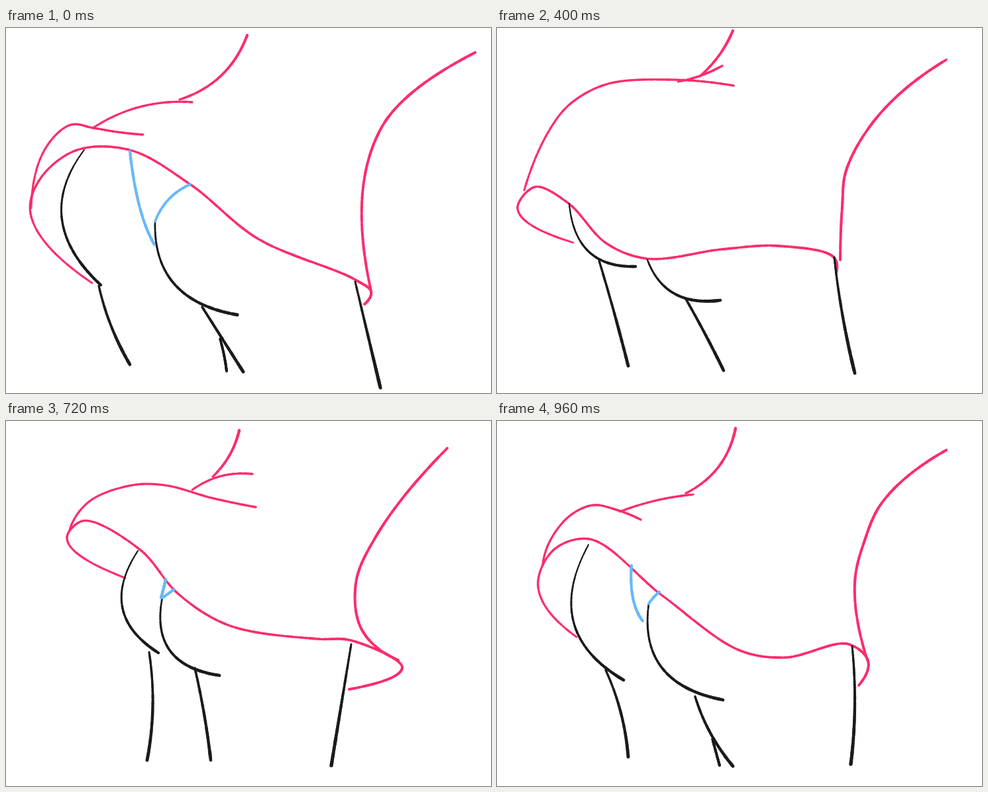
An HTML page with a canvas for the animation above (1040 ms loop, 732 by 551 pixels).

```html
<!DOCTYPE html>
<html lang="en">
<head>
<meta charset="utf-8">
<title>Crayon sway</title>
<style>
html, body { margin: 0; width: 100%; height: 100%; overflow: hidden; background: #fff; }
canvas { display: block; }
</style>
</head>
<body>
<canvas id="stage" width="732" height="551"></canvas>
<script>
const ctx = document.getElementById('stage').getContext('2d');
const STEP = 80, STEPS = 13;
const KEYS = [0, 3, 5, 7, 9, 11, 12];
const PINK = '#fb2d6c', BLACK = '#191c1b', BLUE = '#68b9fa';
const strokes = [];

// One line per pose: points to pass through, or two ends and a bow. "none" hides it.
function add(color, w0, w1, text) {
  const poses = text.trim().split('\n').map(s => (s.match(/-?\d+/g) || []).map(Number));
  strokes.push({ color, w0, w1, poses });
}

// upper side
add(PINK, 4, 3.3, `364,11 262,108 17
  360,10 315,64 4
  356,4 306,73 5
  356,4 307,82 4
  352,14 312,84 6
  360,9 305,100 10
  360,11 285,109 15`);
// crease
add(PINK, 3, 3.3, `131,151 281,112 13
  290,69 346,66 3
  273,81 340,57 -3
  285,97 356,55 -6
  281,104 372,80 9
  247,122 324,104 10
  185,137 296,111 4`);
// back
add(PINK, 3, 3.3, `38,272 60,181 98,146 132,151 168,157 207,161
  20,229 70,170 125,116 180,78 245,63 318,79
  41,245 78,156 110,115 165,85 260,78 357,87
  72,139 120,97 178,80 230,87 290,98 348,95
  96,164 125,122 190,97 240,97 310,116 377,130
  86,209 115,151 155,115 195,104 247,122 288,141
  69,217 80,181 110,143 145,127 180,134 217,149`);
// hem, from the left loop to the right loop
add(PINK, 3, 3.8, `130,385 37,280 50,230 105,185 186,184 278,236 380,318 527,380 551,398 541,417
  89,261 14,237 35,211 105,208 200,250 265,306 348,336 465,321 505,337 520,371
  115,324 31,272 57,240 107,264 165,325 225,348 340,334 425,329 509,347 512,369
  130,226 65,155 88,131 138,220 190,283 260,320 410,346 488,342 520,374 501,409
  180,237 92,176 115,151 202,194 260,261 335,308 470,329 520,331 598,372 518,405
  128,284 86,212 120,185 165,202 290,307 380,355 480,323 540,308 585,341 527,407
  120,326 62,250 85,195 138,178 250,264 368,347 435,357 531,337 560,362 546,399`);
// right side
add(PINK, 4, 3.8, `708,37 590,119 558,168 538,250 551,397
  684,40 583,133 535,209 517,290 520,357
  678,48 575,133 527,215 521,270 518,350
  645,45 590,118 516,240 527,340 519,403
  666,41 558,175 528,245 537,315 592,361
  666,46 592,128 553,189 540,240 572,318
  678,44 582,122 555,180 540,245 559,361`);
// near curve and leg
add(BLACK, 2, 4.5, `118,184 84,285 143,388
  103,207 98,309 179,372
  109,265 140,339 209,360
  134,217 150,290 195,332
  199,196 176,283 230,350
  160,198 136,305 210,384
  138,187 116,305 191,391`);
add(BLACK, 3.2, 4.8, `140,389 187,508 -5
  141,358 192,502 2
  154,351 198,510 1
  179,326 199,502 -6
  216,349 213,512 7
  190,377 214,512 3
  164,376 198,507 6`);
// middle curve and leg
add(BLACK, 2.5, 4.8, `225,292 252,384 349,433
  214,297 243,378 342,408
  227,350 266,400 337,411
  186,280 219,364 298,376
  236,266 247,346 322,384
  228,281 248,370 344,404
  229,276 247,370 341,421`);
add(BLACK, 3.5, 4.8, `296,421 358,519 0
  283,406 343,514 2
  285,409 342,517 1
  260,384 308,510 -6
  285,373 309,512 2
  300,409 331,517 -3
  299,416 356,521 -6`);
add(BLACK, 3.5, 4, `323,469 333,518 1
  none
  none
  none
  none
  none
  325,480 336,520 0`);
// far leg
add(BLACK, 3, 5.2, `527,383 565,543 0
  516,349 550,531 0
  509,346 540,521 -3
  489,345 510,518 -2
  521,337 491,520 0
  531,311 514,530 7
  536,340 534,518 5`);
// blue wedge
add(BLUE, 4, 4.2, `187,186 206,285 224,327
  199,250 199,288 212,312
  none
  none
  241,239 238,252 234,267
  208,240 214,270 221,303
  203,218 207,275 220,302`);
add(BLUE, 3.8, 3.6, `278,236 225,292 -8
  228,277 213,300 -2
  none
  none
  254,254 236,267 0
  243,268 229,279 0
  245,258 229,276 -1`);

const mix = (a, b, t) => a + (b - a) * t;
const noise = n => { const s = Math.sin(n * 12.9898) * 43758.5453; return s - Math.floor(s); };

function bowed([x0, y0, x1, y1, bow]) {
  const dx = x1 - x0, dy = y1 - y0, k = bow / Math.hypot(dx, dy);
  return [x0, y0, (x0 + x1) / 2 + dy * k, (y0 + y1) / 2 - dx * k, x1, y1];
}

// Tangents of a smooth curve through values p with knot gaps h
function tangents(p, h) {
  const n = h.length, d = h.map((g, i) => (p[i + 1] - p[i]) / g);
  const m = p.map((_, i) => i && i < n ? (d[i - 1] * h[i] + d[i] * h[i - 1]) / (h[i - 1] + h[i]) : 0);
  m[0] = 2 * d[0] - m[1];
  m[n] = 2 * d[n - 1] - m[n - 1];
  return m;
}

function hermite(p, m, h, i, t) {
  const c1 = p[i] + m[i] * h[i] / 3, c2 = p[i + 1] - m[i + 1] * h[i] / 3, s = 1 - t;
  return s * s * s * p[i] + 3 * s * s * t * c1 + 3 * s * t * t * c2 + t * t * t * p[i + 1];
}

function drawStroke({ color, w0, w1 }, pose, seed) {
  const pts = pose.length % 2 ? bowed(pose) : pose;
  const xs = pts.filter((_, i) => i % 2 === 0), ys = pts.filter((_, i) => i % 2);
  const h = xs.slice(1).map((x, i) => Math.hypot(x - xs[i], ys[i + 1] - ys[i]) ** 0.6);
  const mx = tangents(xs, h), my = tangents(ys, h), cuts = 20, count = h.length * cuts;
  ctx.strokeStyle = color;
  let from = [xs[0], ys[0]];
  for (let k = 1; k <= count; k++) {
    const i = Math.floor((k - 1) / cuts), t = k / cuts - i;
    const to = [hermite(xs, mx, h, i, t), hermite(ys, my, h, i, t)];
    ctx.lineWidth = mix(w0, w1, k / count) * (0.92 + 0.16 * noise(seed + k));
    ctx.beginPath();
    ctx.moveTo(...from);
    ctx.lineTo(...to);
    ctx.stroke();
    from = to;
  }
}

function draw(step) {
  const i = KEYS.filter(k => k <= step).length - 1;
  const j = (i + 1) % KEYS.length;
  const t = (step - KEYS[i]) / ((KEYS[j] || STEPS) - KEYS[i]);
  ctx.fillStyle = '#fff';
  ctx.fillRect(0, 0, 732, 551);
  ctx.lineCap = 'round';
  strokes.forEach((stroke, n) => {
    const a = stroke.poses[i], b = stroke.poses[j];
    if (!a.length || (t && !b.length)) return;
    drawStroke(stroke, t ? a.map((v, k) => mix(v, b[k], t)) : a, n * 100 + step);
  });
}

function tick() {
  draw(Math.floor(performance.now() / STEP) % STEPS);
  requestAnimationFrame(tick);
}
tick();
</script>
</body>
</html>
```
